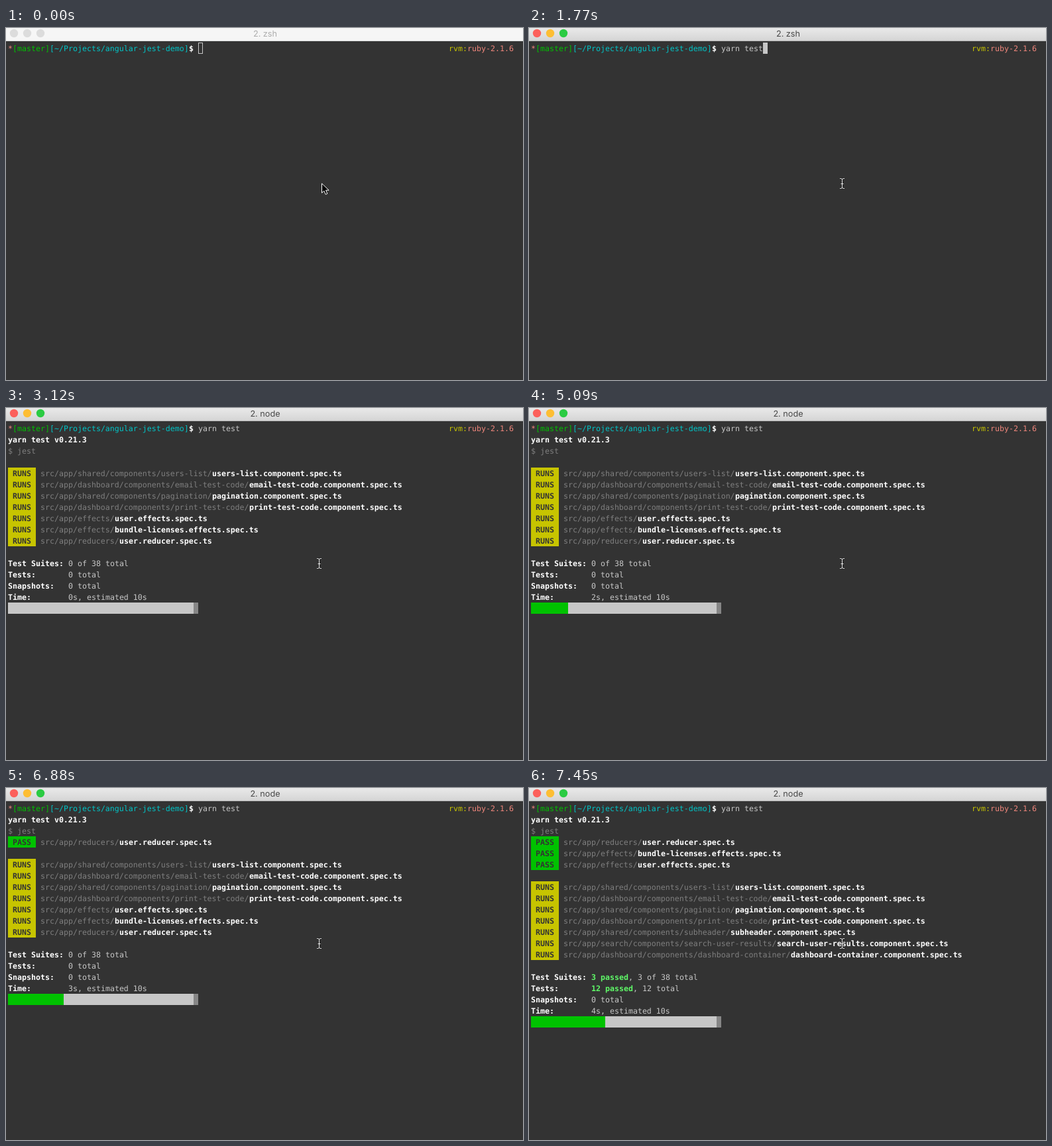
These frames come from a looping animation (780x532 px, 8 s). An HTML page:

```html
<!DOCTYPE html>
<html lang="en">
<head>
<meta charset="utf-8">
<title>Terminal test run</title>
<style>
  html, body { margin: 0; width: 100%; height: 100%; overflow: hidden; background: #333; }
  svg { display: block; width: 780px; height: 532px; }
  text { white-space: pre; text-rendering: geometricPrecision; }
  .mono { font: 11.627px "DejaVu Sans Mono", monospace; }
  .bold { font-weight: 700; }
  .title { font: 12.7px Inter, sans-serif; text-anchor: middle; }
</style>
</head>
<body>
<svg id="stage" viewBox="0 0 780 532" xmlns="http://www.w3.org/2000/svg">
  <defs>
    <linearGradient id="bar" x2="0" y2="1">
      <stop offset="0" stop-color="#e9e9e9"/>
      <stop offset="1" stop-color="#d5d5d5"/>
    </linearGradient>
  </defs>
  <rect width="780" height="532" fill="#333"/>
  <g id="chrome"></g>
  <g id="screen"></g>
  <g id="pointer"></g>
</svg>
<script>
const LOOP = 8000, CELL = 7, ROW = 17, LEFT = 3, TOP = 22;
const C = {
  text: '#c7c7c7', white: '#fff', dim: '#7f7f7f', green: '#00c200', lime: '#5ffa68',
  yellow: '#c7c400', cyan: '#00c5c7', pink: '#f0867c', back: '#333', cursor: '#868686'
};

const SHARED = 'src/app/shared/components/';
const DASH = 'src/app/dashboard/components/';
const spec = (dir, name) => [dir, name + '.spec.ts'];
const part = (base, name) => spec(`${base}${name}/`, name + '.component');
const list = part(SHARED, 'users-list');
const email = part(DASH, 'email-test-code');
const pages = part(SHARED, 'pagination');
const print = part(DASH, 'print-test-code');
const effects = spec('src/app/effects/', 'user.effects');
const licenses = spec('src/app/effects/', 'bundle-licenses.effects');
const reducer = spec('src/app/reducers/', 'user.reducer');
const subheader = part(SHARED, 'subheader');
const search = part('src/app/search/components/', 'search-user-results');
const dashboard = part(DASH, 'dashboard-container');

const common = [list, email, pages, print];
const firstRuns = [...common, effects, licenses, reducer];
const nextRuns = [...common, effects, search, dashboard];
const lastRuns = [...common, subheader, search, dashboard];
const done = [reducer, licenses, effects];

// Each entry holds from its time until the next one.
const typed = [[0, 0], [1150, 2], [1330, 4], [1510, 5], [1600, 6], [1690, 8], [1770, 9]];
const seconds = [[0, 0], [4100, 1], [5090, 2], [6080, 3], [7060, 4]];
const passes = [[0, 0], [6880, 1], [6970, 2], [7330, 3]];
const running = [[0, firstRuns], [7060, nextRuns], [7450, lastRuns]];
const totals = [[0, [0, 0]], [7060, [2, 9]], [7450, [3, 12]]];
const at = (steps, t) => steps.filter(s => s[0] <= t).pop()[1];

const box = (x, y, w, h, fill) =>
  `<rect x="${x}" y="${y}" width="${w}" height="${h}" fill="${fill}"/>`;
const cells = (col, row, n, fill) =>
  box(LEFT + col * CELL, TOP + row * ROW, n * CELL, ROW, fill);
const put = (col, row, str, fill = C.text, bold = false) =>
  `<text class="mono${bold ? ' bold' : ''}" x="${LEFT + col * CELL}" y="${TOP + row * ROW + 13}" fill="${fill}">${str}</text>`;

function chrome(t) {
  const active = t >= 270;
  const lights = active ? ['#fc605b', '#fdbe33', '#2bcb42'] : ['#dcdcdc', '#dcdcdc', '#dcdcdc'];
  return box(0, 0, 780, 19, active ? 'url(#bar)' : '#f6f6f6') +
    box(0, 19, 780, 1, active ? '#b4b4b4' : '#d6dada') +
    lights.map((c, i) => `<circle cx="${12 + i * 20}" cy="8" r="6.2" fill="${c}"/>`).join('') +
    `<text class="title" x="391" y="12.8" fill="${active ? '#484848' : '#adadad'}">2. ${t < 2670 ? 'zsh' : 'node'}</text>`;
}

function prompt(t) {
  return put(0, 0, '*', C.pink) + put(1, 0, '[master]', C.green) +
    put(9, 0, '[~/Projects/angular-jest-demo]', C.cyan) + put(39, 0, '$', C.white, true) +
    put(41, 0, 'yarn test'.slice(0, at(typed, t))) +
    put(95, 0, 'rvm:', C.yellow) + put(99, 0, 'ruby-2.1.6', C.pink);
}

function cursor(t) {
  if (t < 270) return '<rect x="290.5" y="22.5" width="6" height="16" fill="none" stroke="#c7c7c7"/>';
  if (t < 1950) return cells(41 + at(typed, t), 0, 1, C.text);
  if (t < 3030) return cells(0, t < 2040 ? 1 : t < 2220 ? 2 : 3, 1, C.text);
  return '';
}

const suite = (row, label, fill, [dir, file]) =>
  cells(0, row, 6, fill) + put(1, row, label, C.back, true) +
  put(7, row, dir, C.dim) + put(7 + dir.length, row, file, C.white, true);

function count(row, label, n, rest) {
  const passed = n ? `${n} passed` : '';
  return put(0, row, label, C.white, true) + put(13, row, passed, C.lime, true) +
    put(13 + passed.length, row, (n ? ', ' : '') + rest);
}

function report(t) {
  const sec = at(seconds, t), [suites, tests] = at(totals, t);
  const passed = done.slice(0, at(passes, t));
  const runs = at(running, t);
  const start = 4 + passed.length;
  const foot = start + runs.length + 1;
  return passed.map((s, i) => suite(3 + i, 'PASS', C.green, s)).join('') +
    runs.map((s, i) => suite(start + i, 'RUNS', C.yellow, s)).join('') +
    count(foot, 'Test Suites:', suites, `${suites} of 38 total`) +
    count(foot + 1, 'Tests:', tests, `${tests} total`) +
    count(foot + 2, 'Snapshots:', 0, '0 total') +
    count(foot + 3, 'Time:', 0, `${sec}s, estimated 10s`) +
    cells(0, foot + 4, 40, C.text) + cells(0, foot + 4, sec * 4, C.green) +
    cells(40, foot + 4, 1, C.cursor);
}

function screen(t) {
  return prompt(t) + cursor(t) +
    (t >= 2040 ? put(0, 1, 'yarn test v0.21.3', C.white, true) : '') +
    (t >= 2220 ? put(0, 2, '$ jest', C.dim) : '') +
    (t >= 3030 ? report(t) : '');
}

function pointer(t) {
  if (t < 350) {
    return '<path d="M476.5 235v14.2l3.3-3.1 2.4 5.4 2.6-1.1-2.3-5.2h4.6z" fill="#000" stroke="#fff"/>';
  }
  const beam = 'M469 227.5h1.5q2 0 2 2v11q0 2-2 2h-1.5M476 227.5h-1.5q-2 0-2 2M476 242.5h-1.5q-2 0-2-2M470.5 235.5h4';
  return `<path d="${beam}" fill="none" stroke="#222" stroke-width="2.4"/>` +
    `<path d="${beam}" fill="none" stroke="#f2f2f2"/>`;
}

const layers = Object.entries({ chrome, screen, pointer })
  .map(([id, draw]) => ({ node: document.getElementById(id), draw, last: '' }));

function render(t) {
  for (const layer of layers) {
    const markup = layer.draw(t);
    if (markup !== layer.last) layer.node.innerHTML = layer.last = markup;
  }
}

const begin = performance.now();
function tick() {
  render((performance.now() - begin) % LOOP);
  requestAnimationFrame(tick);
}
tick();
</script>
</body>
</html>
```
